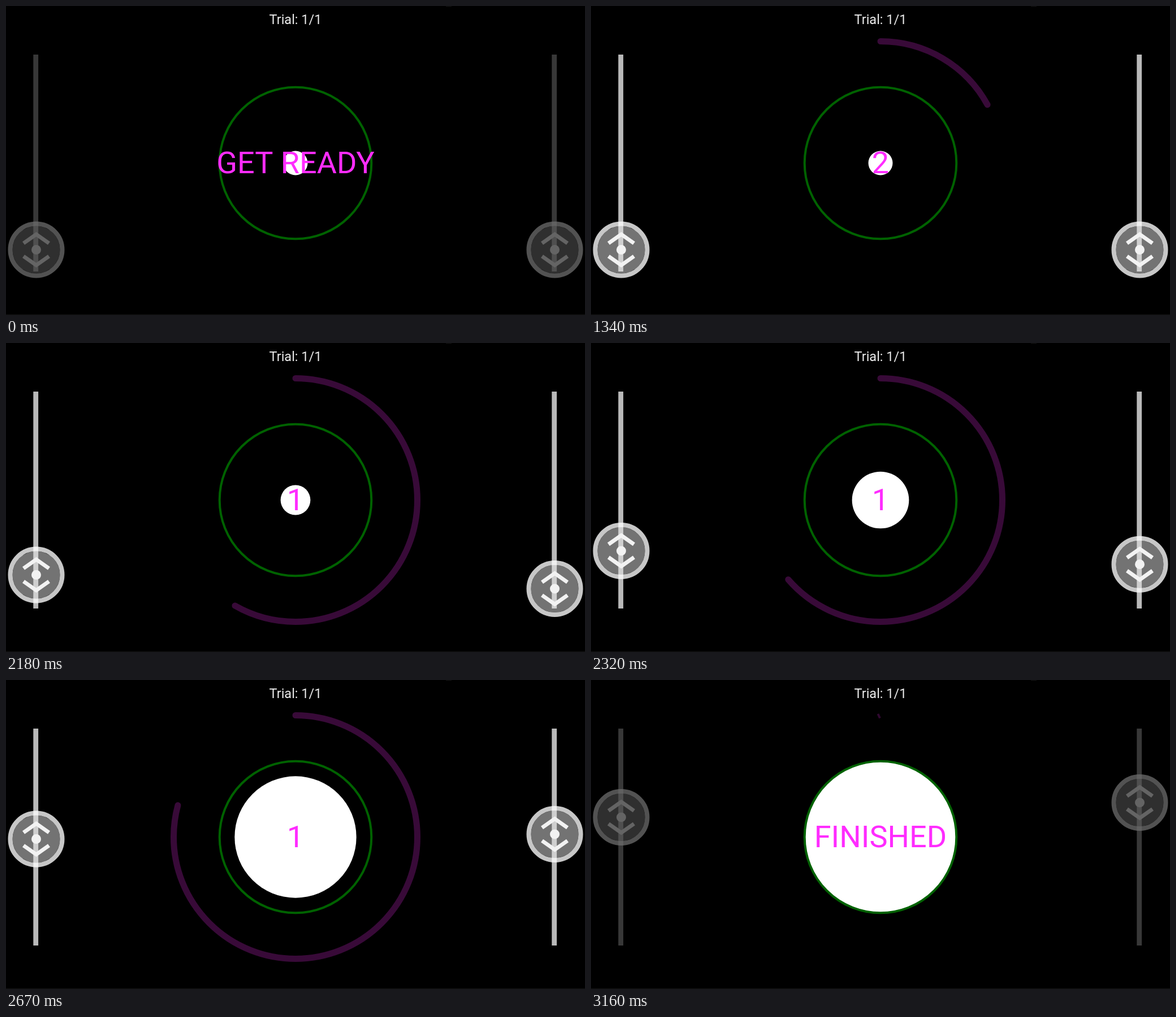
Write an HTML page with a canvas that moves like this. It is 1024x547 px and loops after 3620 ms.

```html
<!DOCTYPE html>
<html lang="en">
<head>
<meta charset="utf-8">
<title>Trial</title>
<style>
  html, body { margin: 0; width: 100%; height: 100%; overflow: hidden; background: #000; }
  canvas { display: block; width: 100vw; height: 100vh; }
</style>
</head>
<body>
<canvas id="stage" width="1024" height="547"></canvas>
<script>
const ctx = document.getElementById('stage').getContext('2d');

const LOOP = 3620, START = 990, STEP = 70, LAST_STEP = 31;
const CX = 512, CY = 278;
const REST_Y = 431.5;

// Keys are [step, value] pairs.
const ARC_DEGREES = [[0, 2.3], [7, 85], [11, 129.3], [15, 185.7], [17, 209.8],
                     [21, 248.7], [24, 285.1], [30, 352]];
const LEFT_Y = [[15, REST_Y], [16, 425], [17, 410.5], [21, 324], [23, 291], [24, 281.5], [31, 243]];
const RIGHT_Y = [[15, REST_Y], [16, 434], [17, 435], [21, 325.5], [23, 286], [24, 273], [31, 217]];

const ACTIVE = { bar: '#b9b9b9', fill: 'rgba(230,230,230,.5)', ring: 'rgba(255,255,255,.78)', mark: '#f2f2f2' };
const IDLE = { bar: '#383838', fill: 'rgba(110,110,110,.43)', ring: 'rgba(110,110,110,.75)', mark: '#646464' };

function segmentAt(keys, x) {
  let i = 0;
  while (i < keys.length - 2 && x >= keys[i + 1][0]) i++;
  return i;
}

const clampTo = (keys, x) => Math.min(Math.max(x, keys[0][0]), keys[keys.length - 1][0]);

function linear(keys, x) {
  x = clampTo(keys, x);
  const i = segmentAt(keys, x);
  const [x0, y0] = keys[i], [x1, y1] = keys[i + 1];
  return y0 + (y1 - y0) * (x - x0) / (x1 - x0);
}

// Monotone cubic: smooth, without overshoot, at rest at both ends.
function smooth(keys, x) {
  x = clampTo(keys, x);
  const slope = i => (keys[i + 1][1] - keys[i][1]) / (keys[i + 1][0] - keys[i][0]);
  const tangent = i => {
    if (i === 0 || i === keys.length - 1) return 0;
    const a = slope(i - 1), b = slope(i);
    return a * b > 0 ? 2 * a * b / (a + b) : 0;
  };
  const i = segmentAt(keys, x);
  const [x0, y0] = keys[i], [x1, y1] = keys[i + 1];
  const h = x1 - x0, t = (x - x0) / h, u = 1 - t;
  return y0 * (1 + 2 * t) * u * u + h * tangent(i) * t * u * u
       + y1 * t * t * (3 - 2 * t) - h * tangent(i + 1) * t * t * u;
}

function disc(x, y, r, color) {
  ctx.fillStyle = color;
  ctx.beginPath();
  ctx.arc(x, y, r, 0, Math.PI * 2);
  ctx.fill();
}

function strokeArc(x, y, r, width, color, degrees = 360) {
  ctx.strokeStyle = color;
  ctx.lineWidth = width;
  ctx.beginPath();
  ctx.arc(x, y, r, -Math.PI / 2, (degrees - 90) * Math.PI / 180);
  ctx.stroke();
}

function strokeLine(points, width, color) {
  ctx.strokeStyle = color;
  ctx.lineWidth = width;
  ctx.beginPath();
  points.forEach(([x, y]) => ctx.lineTo(x, y));
  ctx.stroke();
}

function label(text, baseline, size, color) {
  ctx.font = `${size}px Roboto, sans-serif`;
  ctx.textAlign = 'center';
  ctx.fillStyle = color;
  ctx.fillText(text, CX, baseline);
}

function slider(x, y, look) {
  ctx.fillStyle = look.bar;
  ctx.fillRect(x - 5.2, 86, 8.8, 384);
  disc(x, y, 42, look.fill);
  strokeArc(x, y, 46, 8, look.ring);
  for (const dir of [-1, 1]) {
    strokeLine([[x - 22.5, y + 11.5 * dir], [x, y + 27.3 * dir], [x + 22.5, y + 11.5 * dir]], 7, look.mark);
  }
  disc(x, y, 8.5, look.mark);
}

function draw(time) {
  const step = Math.floor((time - START) / STEP);
  const ready = time < START;
  const finished = step >= LAST_STEP;
  const running = !ready && !finished;
  const degrees = linear(ARC_DEGREES, step);
  const leftY = smooth(LEFT_Y, step), rightY = smooth(RIGHT_Y, step);
  const rise = REST_Y - (leftY + rightY) / 2;

  ctx.fillStyle = '#000';
  ctx.fillRect(0, 0, 1024, 547);
  ctx.fillStyle = '#141414';
  ctx.fillRect(0, 546, 1024, 1);
  ctx.fillRect(778, 0, 10, 1);

  label('Trial: 1/1', 31.5, 23.5, '#ececec');

  if (running) {
    ctx.lineCap = 'round';
    strokeArc(CX, CY, 215.5, 11, '#380a38', degrees);
    ctx.lineCap = 'butt';
  } else if (finished) {
    strokeLine([[507.5, 60], [511, 67.5]], 4, '#300830');
  }

  disc(CX, CY, 21.5 + 0.5585 * rise, '#fff');
  strokeArc(CX, CY, 134.3, 4, '#006200');

  const look = running ? ACTIVE : IDLE;
  slider(53.5, leftY, look);
  slider(970.5, rightY, look);

  const message = ready ? 'GET READY' : finished ? 'FINISHED' : degrees < 180 ? '2' : '1';
  label(message, 296.3, 54, '#ff2cff');
}

const origin = performance.now();
function frame() {
  draw((performance.now() - origin) % LOOP);
  requestAnimationFrame(frame);
}
frame();
</script>
</body>
</html>
```
